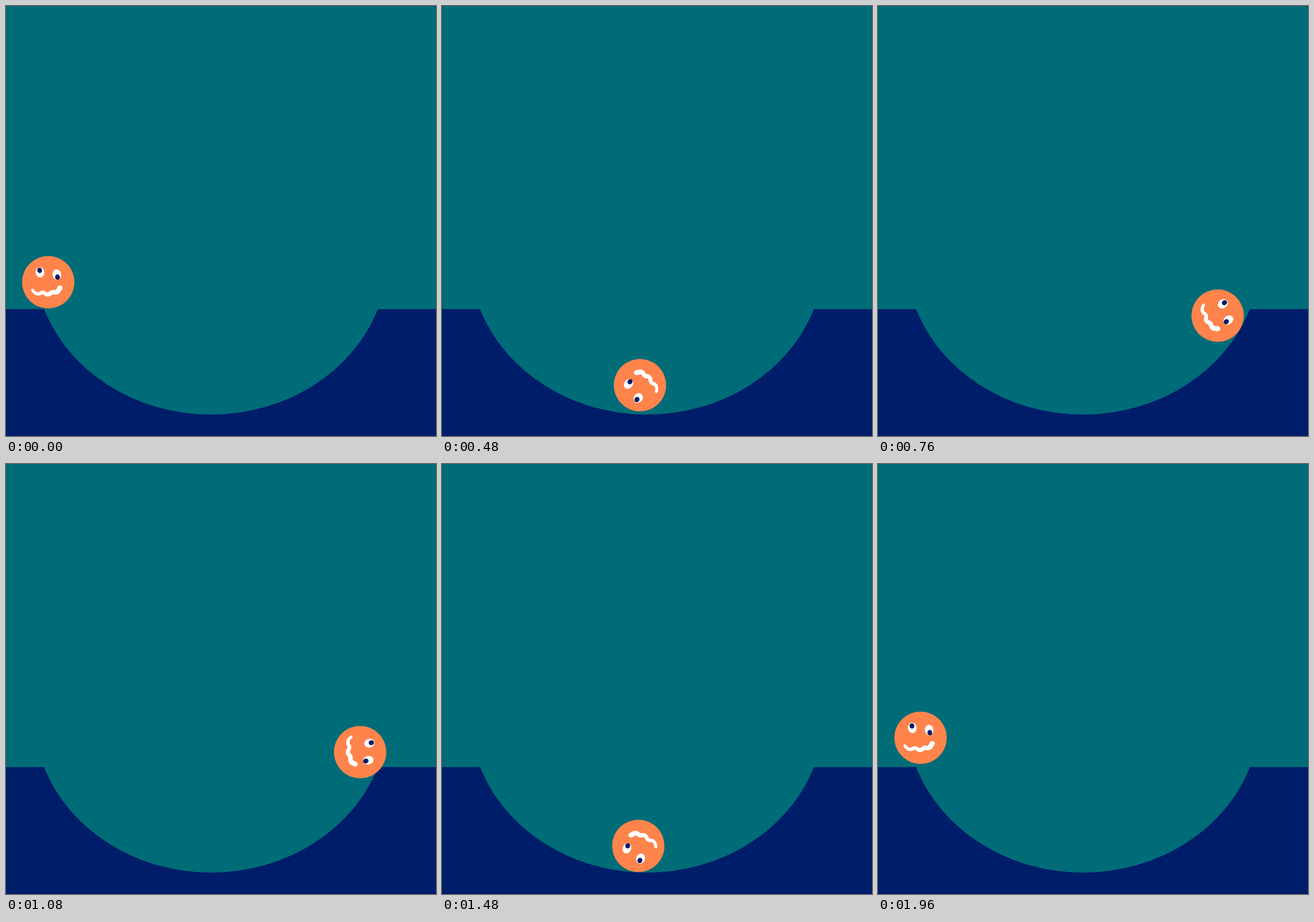
Write an HTML page that moves like this. It is 748 px wide and 748 px high and loops after 2 s.

```html
<!DOCTYPE html>
<html lang="en">
<head>
<meta charset="utf-8">
<title>Rolling ball</title>
<style>
  html, body { margin: 0; width: 100%; height: 100%; overflow: hidden; background: #006c77; }
  svg { display: block; width: 100vw; height: 100vh; }
</style>
</head>
<body>
<svg viewBox="0 0 748 748">
  <rect width="748" height="748" fill="#006c77"/>
  <path d="M0 527.3H66.3A308 275.5 0 0 0 646.9 527.3H748V748H0Z" fill="#001d69"/>
  <g id="ball">
    <circle r="45.5" fill="#ff844b"/>
    <g fill="#fff">
      <ellipse rx="7.6" ry="9" transform="translate(-14.4 -17.2) rotate(-8)"/>
      <ellipse rx="7.4" ry="9.2" transform="translate(15 -13.4) rotate(-8)"/>
      <g id="mouth"></g>
    </g>
    <g fill="#001d69">
      <ellipse rx="4.2" ry="4.7" transform="translate(-15 -20.6) rotate(-8)"/>
      <ellipse rx="4.2" ry="4.7" transform="translate(16.1 -8.9) rotate(-8)"/>
    </g>
  </g>
</svg>
<script>
const LOOP = 2000, STEP = 40, TURN = 960, SPIN = 456;
const ball = document.getElementById('ball');
const mouth = document.getElementById('mouth');

function make(tag, attrs) {
  const el = document.createElementNS('http://www.w3.org/2000/svg', tag);
  for (const name in attrs) el.setAttribute(name, attrs[name]);
  return el;
}

function curve(d) {
  const path = make('path', { d });
  const length = path.getTotalLength();
  return u => path.getPointAtLength(u * length);
}

// Cubic ease with horizontal tangents; a and b are the handle times.
function ease(a, b) {
  return x => {
    x = Math.min(1, Math.max(0, x));
    let lo = 0, hi = 1, s = 0.5;
    for (let i = 0; i < 30; i++) {
      s = (lo + hi) / 2;
      const time = 3 * a * s * (1 - s) ** 2 + 3 * b * s * s * (1 - s) + s ** 3;
      if (time < x) lo = s; else hi = s;
    }
    return s * s * (3 - 2 * s);
  };
}

// The mouth is a wavy brush stroke that thickens to the right.
const smile = curve('M-27.5 13.5Q-23.5 20 -17.5 20.3C-13.5 20.3 -12.5 17 -8.5 18' +
  'C-5 19 -4.5 21.8 -.5 21.5C3.5 21 4.5 16.8 8.5 17.2C12.5 18.5 15.5 18 17.5 14.5L20.5 9.8');
for (let i = 0; i <= 80; i++) {
  const u = i / 80, p = smile(u);
  mouth.append(make('circle', { cx: p.x, cy: p.y, r: 2.3 + 1.8 * u }));
}

const rollRight = curve('M73.5 480.5C225 673 465 764 624.5 487');
const rollLeft = curve('M624.5 487C458 774 170 672 73.3 474.7');
const easeRight = ease(0.44, 0.58);
const easeLeft = ease(0.45, 0.54);
const easeSpin = ease(0.5, 0.5);

function draw(t) {
  const back = t >= TURN;
  const p = back
    ? rollLeft(easeLeft((t - TURN) / (LOOP - TURN)))
    : rollRight(easeRight(t / TURN));
  const angle = SPIN * (back ? 1 - easeSpin((t - TURN) / 1000) : easeSpin(t / TURN));
  ball.setAttribute('transform', `translate(${p.x} ${p.y}) rotate(${angle})`);
}

const start = performance.now();
function tick() {
  const t = (performance.now() - start) % LOOP;
  draw(Math.floor(t / STEP) * STEP);
  requestAnimationFrame(tick);
}
tick();
</script>
</body>
</html>
```
